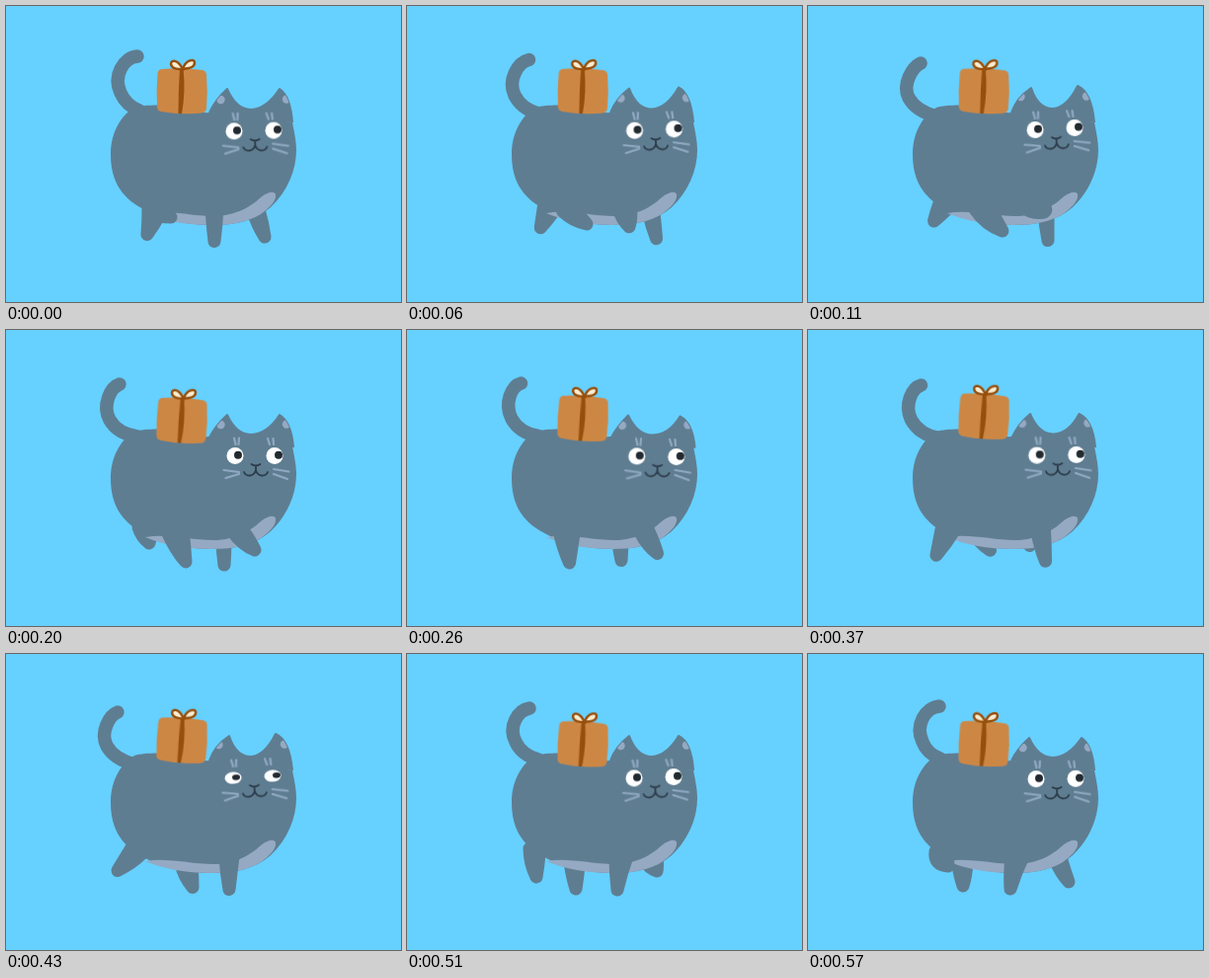
These frames come from a looping animation (400 px wide and 300 px high, 0.6 s). An HTML page without scripts:

```html
<!DOCTYPE html>
<html lang="en">
<head>
<meta charset="utf-8">
<title>Walking cat</title>
<style>
html, body { margin: 0; width: 100%; height: 100%; overflow: hidden; background: #66d0ff; }
svg { display: block; width: 100%; height: 100%; }

.fur { fill: #5f7d91; stroke: #5f7d91; stroke-width: 0; stroke-linejoin: round; }
.leg { stroke-width: 13; stroke-linecap: round; }
.tail { fill: none; stroke: #5f7d91; stroke-width: 13.5; stroke-linecap: round; }
.light { fill: #95a9c3; }
.hair { fill: none; stroke: #8fa8c2; stroke-width: 2.2; stroke-linecap: round; }
.ink { fill: none; stroke: #2c3c4a; stroke-width: 1.8; stroke-linecap: round; stroke-linejoin: round; }
.bow { fill: #f8ecd0; stroke: #964f0c; stroke-width: 2.4; stroke-linejoin: round; }

/* The resting pose of each part is both start and end of its loop. */
.move { animation: .6s steps(4) infinite; }
.tail { animation-name: tail; }
.far-hind { animation-name: far-hind; }
.far-fore { animation-name: far-fore; }
.near-hind { animation-name: near-hind; }
.near-fore { animation-name: near-fore; }
.ears { animation-name: ears; d: path("M206 108Q212 95 224 84Q233 105 248 105Q264 104 277 84Q288 91 290 118"); }
.spots { animation-name: spots; transform: translate(0, 0); }
.face { animation-name: face; transform: translate(-1px, -1px) rotate(-1.2deg); transform-origin: 252px 127px; }
.eyes { animation-name: blink; transform: scaleY(1); transform-origin: 252px 128px; }
.gift { animation-name: gift; transform: translate(0, 0) rotate(0deg); transform-origin: 178px 86px; }

@keyframes tail {
  18.33% { d: path("M114 58C106 62 95 79 102 93C108 104 118 109 131 112"); animation-timing-function: steps(3); }
  33.33% { d: path("M115 55C106 58 97 76 105 91C110 100 120 106 133 108"); }
  51.67% { d: path("M116 53C106 55 99 72 107 89C112 98 120 105 133 107"); }
  71.67% { d: path("M113 59C105 62 95 79 102 93C108 104 118 109 131 112"); animation-timing-function: steps(3); }
  85% { d: path("M124 55C112 57 102 74 110 89C114 98 122 104 133 107"); animation-timing-function: steps(2); }
  95% { d: path("M133 53C119 54 108 72 116 89C119 97 126 103 134 106"); animation-timing-function: steps(1); }
}
@keyframes far-hind {
  18.33% { d: path("M141 206Q134 213 127.5 218Q130 208 133 200"); animation-timing-function: steps(3); }
  33.33% { d: path("M147 205Q147 210 145 216Q137 210 134 200"); }
  51.67% { d: path("M180 200Q178 205 180 210Q165 205 160 200"); }
  71.67% { d: path("M188 214Q189 225 189 236.5Q180 226 177 212"); animation-timing-function: steps(3); }
  85% { d: path("M174 214Q173 225 171 238Q167 226 165 210"); animation-timing-function: steps(2); }
  95% { d: path("M161 212Q160 225 157 235Q154 226 151 210"); animation-timing-function: steps(1); }
}
@keyframes far-fore {
  18.33% { d: path("M243 208Q243 222 243 237.5Q240 222 239 208"); animation-timing-function: steps(3); }
  33.33% { d: path("M222 210Q222 225 221 238Q219 225 219 210"); }
  51.67% { d: path("M213 212Q214 220 213 229Q210 222 209 212"); }
  71.67% { d: path("M235 204Q236 206 236 208Q232 207 230 204"); animation-timing-function: steps(3); }
  85% { d: path("M253 206Q254 215 253 220Q245 217 240 209"); animation-timing-function: steps(2); }
  95% { d: path("M256 206Q260 220 264 231Q255 221 250 208"); animation-timing-function: steps(1); }
}
@keyframes near-hind {
  18.33% { d: path("M183 203Q190 215 197 228Q180 222 169 206"); animation-timing-function: steps(3); }
  33.33% { d: path("M179 203Q181 220 182 235Q172 224 163 204"); }
  51.67% { d: path("M160 202Q153 220 147 237Q145 222 144 200"); }
  71.67% { d: path("M137 203Q128 212 113 219.5Q120 208 128 195"); animation-timing-function: steps(3); }
  85% { d: path("M134 202Q133 215 131 226Q124 212 124 197"); animation-timing-function: steps(2); }
  95% { d: path("M141 203Q142 212 142 215Q127 214 129 200"); animation-timing-function: steps(1); }
}
@keyframes near-fore {
  18.33% { d: path("M238 203Q243 206 239 209Q226 211 220 205"); animation-timing-function: steps(3); }
  33.33% { d: path("M240 203Q248 214 252 223Q240 219 229 204"); }
  51.67% { d: path("M249 203Q253 218 255 230Q247 220 242 204"); }
  71.67% { d: path("M230 205Q228 222 226 238.5Q223 222 222 205"); animation-timing-function: steps(3); }
  85% { d: path("M223 205Q217 222 213 239Q211 222 211 205"); animation-timing-function: steps(2); }
  95% { d: path("M218 205Q210 222 205 238Q204 224 206 205"); animation-timing-function: steps(1); }
}
@keyframes ears {
  18.33%, 71.67% { d: path("M206 108Q211 93 226 83Q233 104 248 104Q262 103 273 81Q287 87 290 118"); animation-timing-function: steps(3); }
  33.33% { d: path("M206 109Q212 97 224 86Q233 106 248 106Q265 105 277 86Q289 93 291 119"); }
  51.67% { d: path("M207 110Q214 98 224 87Q234 107 249 107Q266 107 276 89Q290 96 292 120"); }
  85% { d: path("M206 108Q211 94 225 83Q233 104 248 104Q263 103 275 83Q288 89 290 118"); animation-timing-function: steps(2); }
  95% { d: path("M206 108Q212 96 224 85Q233 105 248 105Q264 104 277 85Q288 92 290 118"); animation-timing-function: steps(1); }
}
@keyframes spots {
  18.33%, 71.67% { transform: translate(-2px, -3px); animation-timing-function: steps(3); }
  33.33% { transform: translate(0, 1px); }
  51.67% { transform: translate(.8px, 2.5px); }
  85% { transform: translate(-1px, -2px); animation-timing-function: steps(2); }
  95% { transform: translate(0, 0); animation-timing-function: steps(1); }
}
@keyframes face {
  18.33%, 71.67% { transform: translate(-2px, -3px) rotate(-3deg); animation-timing-function: steps(3); }
  33.33% { transform: translate(0, 0) rotate(0deg); }
  51.67% { transform: translate(1.5px, 1.5px) rotate(1.5deg); }
  85% { transform: translate(-2px, -2.3px) rotate(-2deg); animation-timing-function: steps(2); }
  95% { transform: translate(-1px, -1px) rotate(-.6deg); animation-timing-function: steps(1); }
}
@keyframes blink {
  61.67% { transform: scaleY(1); animation-timing-function: steps(2); }
  71.67% { transform: scaleY(.72); animation-timing-function: steps(3); }
  85% { transform: scaleY(1); }
}
@keyframes gift {
  18.33% { transform: translate(0, 0) rotate(.8deg); animation-timing-function: steps(3); }
  33.33% { transform: translate(0, 5.5px) rotate(2deg); }
  51.67% { transform: translate(0, 1.3px) rotate(2.4deg); }
  71.67% { transform: translate(0, 1.3px) rotate(2.4deg); animation-timing-function: steps(3); }
  85% { transform: translate(0, 5px) rotate(2deg); animation-timing-function: steps(2); }
  95% { transform: translate(0, 4.7px) rotate(1.8deg); animation-timing-function: steps(1); }
}
</style>
</head>
<body>
<svg viewBox="0 0 400 300">
  <clipPath id="head"><path class="move ears"/></clipPath>
  <rect width="400" height="300" fill="#66d0ff"/>

  <path class="move tail" d="M133 51C119 52 108 71 116 88C120 97 127 103 135 106"/>
  <path class="move fur leg far-hind" d="M156 211Q150 222 143 231.500Q144 218 144 205"/>
  <path class="move fur leg far-fore" d="M256 206Q260 220 262 234Q254 221 250 208"/>

  <path class="fur" d="M206 108L248 109L290 118C292 128 294 138 294 146C294 166 285 188 268 204C252 218 232 222 208 222C180 222 155 216 134 203C113 190 106 172 106 150C106 128 117 110 130 103C140 100 160 100 175 102C190 104 198 109 206 108Z"/>
  <path class="move fur ears" style="stroke-width:2"/>
  <g clip-path="url(#head)">
    <g class="move light spots">
      <circle cx="217.500" cy="95" r="4.200"/>
      <circle cx="284" cy="94.500" r="4.200"/>
    </g>
  </g>

  <path class="light" d="M141 210C165 206 190 214 214 213C238 211 250 201 258 194C264 189 272 187 273 191C274 198 267 204 258 211C245 219 228 222 208 222C182 222 160 218 141 210Z"/>
  <path class="move fur leg near-hind" d="M146 195Q155 205 167 214Q155 214 146 210"/>
  <path class="move fur leg near-fore" d="M214 205Q213 222 211 238.500Q209 222 208 205"/>

  <g class="move face">
    <path class="hair" d="M231 109.500L232.500 116M236 109.500L235.500 116M265 110L267 116M270.500 110L271 116M220.500 142L236 144M222.500 150L236 146M271 141L286.500 143.500M271 146L285 151"/>
    <g class="move eyes">
      <g fill="#fff">
        <circle cx="232" cy="127.500" r="8.500"/>
        <circle cx="272" cy="127.500" r="8.500"/>
      </g>
      <g fill="#222a30">
        <circle cx="235" cy="126.700" r="4"/>
        <circle cx="276" cy="126.700" r="4"/>
      </g>
    </g>
    <path class="ink" d="M248.500 136Q253 139 257.500 136M253 138V142M241 144C243 149 251 149 253 142C255 149 263 149 265 144"/>
  </g>

  <g class="move gift">
    <path fill="#cd8744" d="M157 64Q178 62 199 65Q203 66 203 70Q204.500 87 203 104Q202 108 198 108.500Q177 110.500 157 107Q153 106 153 102Q152 86 153.500 69Q153.500 65 157 64Z"/>
    <path fill="#964f0c" d="M176 63H179.500Q182 87 178 109H174.500Q174.500 86 176 63Z"/>
    <path class="bow" d="M179 64C174 54 167 54 167 59C168 64 174 64 179 64ZM179 64C182 54 191 53 191 57.500C191 63 184 63 179 64Z"/>
    <circle cx="179" cy="63.500" r="2.200" fill="#964f0c"/>
  </g>
</svg>
</body>
</html>
```
